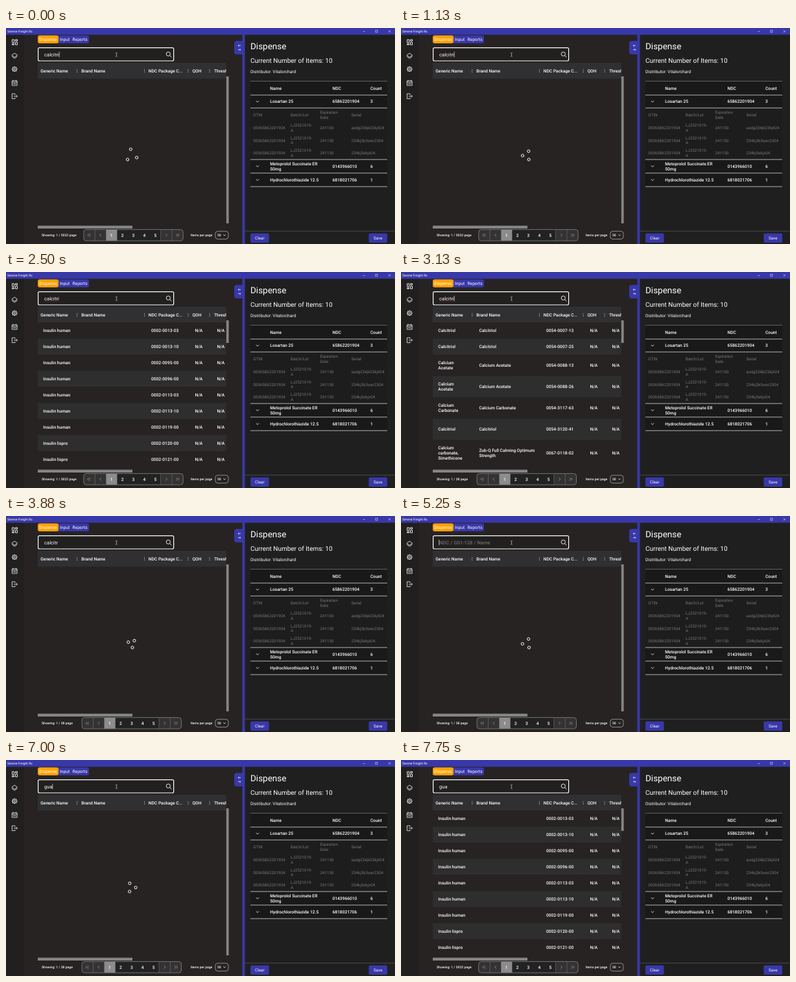
Animation, 600 px wide and 335 px high, one loop 8 s. Source, as an HTML page:

```html
<!DOCTYPE html>
<html lang="en">
<head>
<meta charset="utf-8">
<title>Dispense</title>
<style>
  html, body { margin: 0; width: 100%; height: 100%; overflow: hidden; background: #272323; }
  svg { display: block; width: 100vw; height: 100vh; font-family: Roboto, sans-serif; text-rendering: geometricPrecision; }
</style>
</head>
<body>
<svg id="stage" viewBox="0 0 600 335"></svg>
<script>
const BLUE = '#3938a8', PANEL = '#1f1f1f', MAIN = '#272323', ALT = '#2f2e2f';
const BODY = 6.67, SMALL = 6.25, TINY = 5;
const LOOP = 8000, STEP = 125;

// Drawing helpers; text y is the middle of the capitals.
const rect = (x, y, w, h, fill, extra = '') =>
  `<rect x="${x}" y="${y}" width="${w}" height="${h}" fill="${fill}" ${extra}/>`;
const text = (x, y, str, size = BODY, extra = '') =>
  `<text x="${x}" y="${y + size * 0.355}" font-size="${size}" fill="#fff" ${extra}>${str}</text>`;
const lines = (x, y, str, size = BODY, extra = '', gap = 8) => {
  const parts = str.split('|');
  return parts.map((p, i) => text(x, y + (i - (parts.length - 1) / 2) * gap, p, size, extra)).join('');
};
const path = (d, color = '#fff', width = 0.8) =>
  `<path d="${d}" fill="none" stroke="${color}" stroke-width="${width}"/>`;
const hline = (x1, x2, y, color = '#ddd', width = 0.8) => path(`M${x1} ${y}H${x2}`, color, width);
const chevron = (x, y, dir) => path(`M${x - dir} ${y - 2.2}l${2 * dir} 2.2l${-2 * dir} 2.2`, '#bbb', 0.6);
const down = (x, y, r = 2.2) => path(`M${x - r} ${y - r / 2}l${r} ${r}l${r} ${-r}`);
const group = (id, content) => `<g id="${id}">${content}</g>`;
const MEDIUM = 'font-weight="500"', MID = 'text-anchor="middle"';

function titleBar() {
  return rect(0, 0, 600, 10.5, BLUE) + text(2, 5.2, 'Serene Freight Rx', TINY) +
    path('M550.5 5.5h3M569.8 3.5h3.2v3.2h-3.2zM589.8 3.5l3.4 3.4m0 -3.4l-3.4 3.4', '#fff', 0.5);
}

function sidebar() {
  let gear = '';
  for (let i = 0; i < 8; i++) {
    const a = i * Math.PI / 4, c = Math.cos(a), s = Math.sin(a);
    gear += `M${13.2 + 3 * c} ${63.8 + 3 * s}l${1.3 * c} ${1.3 * s}`;
  }
  return rect(0, 10, 28, 325, '#211f1f') +
    path('M9.5 18h3v4.5h-3zM14.5 18h3v2h-3zM14.5 22h3v4h-3zM9.5 24.5h3v1.5h-3z', '#fff', 0.9) +
    path('M13.2 39l4.3 3.2l-4.3 3.2l-4.3 -3.2zM8.9 44l4.3 3.2l4.3 -3.2') +
    path(gear, '#fff', 1.2) +
    '<g fill="none" stroke="#fff" stroke-width=".8"><circle cx="13.2" cy="63.8" r="3.2"/><circle cx="13.2" cy="63.8" r="1.3"/></g>' +
    path('M9.3 82h7.8v7h-7.8zM9.3 84.2h7.8M11 80.6v1.6M15.4 80.6v1.6M11 86.5h4.5') +
    path('M14 103.5v-1.5h-4.7v7.6h4.7v-1.5M11.8 105.8h5.6m-1.7 -1.8l1.8 1.8l-1.8 1.8');
}

function toolbar() {
  return rect(49, 11.5, 79, 12.3, BLUE, 'rx="3"') + rect(49, 11.5, 32, 12.3, '#ffa200', 'rx="3"') +
    text(51.3, 17.5, 'Dispense') + text(83, 17.5, 'Input') + text(102.5, 17.5, 'Reports') +
    rect(49.6, 30.6, 209, 20.4, '#221f1f', 'rx="2" stroke="#fff" stroke-width="1.2"') +
    '<circle cx="250.3" cy="40.3" r="3.1" fill="none" stroke="#fff" stroke-width=".9"/>' +
    path('M252.6 42.6l2.6 2.6', '#fff', 0.9) +
    path('M168.8 38.6h1l.6 .5l.6 -.5h1M170.4 39v4.6M168.8 44.1h1l.6 -.5l.6 .5h1', '#ddd', 0.6) +
    text(59, 41, '', 7.5, 'id="query" letter-spacing=".07"') +
    '<path id="spell" d="M59 46H82" stroke="#d33" stroke-width=".6" stroke-dasharray="1 .8" opacity=".8"/>' +
    '<path id="caret" d="M0 36.8V45.4" stroke="#fff" stroke-width=".6"/>';
}

function tableHead() {
  const cols = [[53.3, 'Generic Name'], [116.3, 'Brand Name'], [219.8, 'NDC Package C...'], [287.5, 'QOH'], [321, 'Thresh']];
  const dots = [109.7, 213.5, 281, 314].map(x => path(`M${x} 64v5`, '#ccc', 0.9).replace('/>', ' stroke-dasharray="1 1"/>'));
  return rect(49, 54, 291, 24.5, '#303032') +
    cols.map(([x, s]) => text(x, 66.5, s, BODY, MEDIUM)).join('') + dots.join('');
}

function rows(data) {
  let y = 78.5, out = '';
  data.forEach(([generic, brand, ndc, h], i) => {
    const mid = y + h / 2;
    out += rect(49, y, 291, Math.min(h, 304 - y), i % 2 ? ALT : MAIN) +
      lines(57.3, mid, generic, BODY, MEDIUM) + lines(120.4, mid, brand, BODY, MEDIUM) +
      text(224, mid, ndc, BODY, MEDIUM) + text(291.5, mid, 'N/A', BODY, MEDIUM) + text(325.5, mid, 'N/A', BODY, MEDIUM);
    y += h;
  });
  return out;
}

const insulin = ['0013-03', '0013-10', '0095-00', '0096-00', '0113-03', '0113-10', '0119-00', '0120-00', '0121-00']
  .map((n, i) => [i < 7 ? 'Insulin human' : 'Insulin lispro', '', '0002-' + n, 24.95]);
const calcium = [
  ['Calcitriol', 'Calcitriol', '0054-0007-13', 25],
  ['Calcitriol', 'Calcitriol', '0054-0007-25', 25],
  ['Calcium|Acetate', 'Calcium Acetate', '0054-0088-13', 33],
  ['Calcium|Acetate', 'Calcium Acetate', '0054-0088-26', 33],
  ['Calcium|Carbonate', 'Calcium Carbonate', '0054-3117-63', 33],
  ['Calcitriol', 'Calcitriol', '0054-3120-41', 33],
  ['Calcium|carbonate,|Simethicone', 'Zub-Q Full Calming Optimum|Strength', '0067-0118-02', 41],
];

function footer() {
  let pager = rect(119.8, 312.6, 153.4, 17.4, '#222', 'rx="4"') +
    rect(120, 313, 34.4, 16.6, '#343232', 'rx="4"') + rect(238.6, 313, 34.4, 16.6, '#343232', 'rx="4"') +
    rect(154.4, 312.8, 17, 17, '#8c8c8c') +
    path('M137.2 313V330M154.4 313V330M238.6 313V330M256 313V330', '#777', 0.6) +
    rect(119.8, 312.6, 153.4, 17.4, 'none', 'rx="4" stroke="#8a8a8a" stroke-width=".8"') +
    chevron(126.8, 321.3, -1) + chevron(129.4, 321.3, -1) + chevron(145.8, 321.3, -1) +
    chevron(247.4, 321.3, 1) + chevron(263.4, 321.3, 1) + chevron(266, 321.3, 1);
  for (let n = 1; n <= 5; n++) pager += text(145.8 + n * 16.9, 321.3, n, BODY, MEDIUM + MID.replace('text', ' text'));
  return rect(49, 304, 296, 31, MAIN) + rect(49, 306.6, 146, 4.4, '#858585') +
    text(55, 321.3, '', TINY, 'id="showing" font-weight="500" letter-spacing=".04"') + group('pager', pager) +
    text(284.8, 321.3, 'Items per page', TINY, MEDIUM) +
    rect(322.8, 315.2, 20.2, 12.2, 'none', 'rx="4" stroke="#bbb" stroke-width=".7"') +
    text(326, 321.3, '50', TINY, MEDIUM) + down(337, 321.3, 1.6);
}

function panel() {
  const grey = 'style="fill:#777"';
  const item = (y, name, ndc, count) => down(388, y) + lines(407.3, y, name, BODY, MEDIUM) +
    text(503.5, y, ndc, BODY, MEDIUM) + text(562, y, count, BODY, MEDIUM);
  const lot = (y, gtin, batch, date, serial) => text(381.3, y, gtin, SMALL, grey) +
    lines(439, y, batch, SMALL, grey, 7.6) + lines(484.4, y, date, SMALL, grey, 7.6) + text(532.5, y, serial, SMALL, grey);
  const button = (x, label) => rect(x, 318.5, 28.6, 14.4, BLUE, 'rx="2"') + text(x + 14.3, 325.6, label, SMALL, MID);

  return rect(368, 10.5, 232, 325, PANEL) + rect(364.5, 10, 4, 325, BLUE) +
    `<path d="M368 20H356a4 4 0 0 0 -4 4V37a4 4 0 0 0 4 4H368z" fill="${BLUE}"/>` +
    path('M362 27.3h-4m1.4 -1.3l-1.4 1.3l1.4 1.3M358 33.6h4m-1.4 -1.3l1.4 1.3l-1.4 1.3', '#fff', 0.7) +
    text(377, 28, 'Dispense', 13.5) + text(377, 50.5, 'Current Number of Items: 10', 10) +
    text(377, 67.5, 'Distributor: Vitalorchard') +
    rect(377, 82.5, 211, 163.5, '#191919') + rect(377, 124, 211, 80, '#1d1d1d') +
    text(407.3, 93.3, 'Name', BODY, MEDIUM) + text(503.5, 93.3, 'NDC', BODY, MEDIUM) + text(562, 93.3, 'Count', BODY, MEDIUM) +
    hline(377, 588, 82.5, '#777') + [104, 124, 204, 225, 246].map(y => hline(377, 588, y)).join('') +
    item(114, 'Losartan 25', '65862201904', 3) +
    item(214.3, 'Metoprolol Succinate ER|50mg', '0143966010', 6) +
    item(235.6, 'Hydrochlorothiazide 12.5', '6818021706', 1) +
    lot(134.7, 'GTIN', 'Batch/Lot', 'Expiration|Date', 'Serial') +
    ['asdg234jk23kj424', '234kj3k5wer2304', '234kj5ekjx04']
      .map((s, i) => lot(154.6 + i * 19.7, '00365862201904', 'LJ2521019-|A', '241130', s)).join('') +
    hline(368, 600, 315, '#555') + button(377, 'Clear') + button(559.5, 'Save');
}

const ring = '<circle r="2.1" fill="none" stroke="#fff" stroke-width="1"/>';
document.getElementById('stage').innerHTML =
  rect(0, 0, 600, 335, MAIN) + sidebar() + toolbar() + tableHead() +
  group('insulin', rows(insulin)) + group('calcium', rows(calcium)) + group('spinner', ring.repeat(3)) +
  rect(339.8, 54, 25, 250, MAIN) + rect(339.8, 75, 3.8, 228, '#858585', 'id="thumb"') +
  footer() + panel() + titleBar();

const $ = id => document.getElementById(id);
const show = (id, on) => $(id).setAttribute('visibility', on ? 'visible' : 'hidden');

// Search field contents from each moment on.
const keys = [[-125, 'calcitri'], [3375, 'calcitr'], [4000, 'calc'], [4125, 'c'], [4250, ''],
  [6000, 'g'], [6500, 'gu'], [6875, 'gua']];
// Pauses in which the screen stands still: start, end.
const pauses = [[875, 1125], [2000, 2500], [4750, 5000], [7250, 7750], [7750, 8000]];
const corners = [[184.6, 204], [193.85, 185], [203.1, 204]];

function spin(t) {
  const phase = t < 2500 ? 0.84 + t / 760 : 0.44 + (t - 3875) / 738;
  const f = ((phase % 1) + 1) % 1;
  [...$('spinner').children].forEach((dot, i) => {
    const [x1, y1] = corners[i], [x2, y2] = corners[(i + 1) % 3];
    dot.setAttribute('cx', x1 + (x2 - x1) * f);
    dot.setAttribute('cy', y1 + (y2 - y1) * f);
  });
}

function draw(time) {
  let t = Math.floor(time / STEP) * STEP;
  const pause = pauses.find(([a, b]) => t >= a && t < b);
  if (pause) t = pause[0];

  const [typedAt, value] = keys.filter(k => k[0] <= t).pop();
  const query = $('query');
  query.textContent = value || 'NDC / GS1-128 / Name';
  query.setAttribute('fill', value ? '#fff' : '#858383');
  const end = 59 + (value ? query.getComputedTextLength() + 0.2 : -0.3);
  $('caret').setAttribute('transform', `translate(${end})`);
  show('caret', Math.floor((t - typedAt) / 500) % 2 === 0);
  show('spell', t >= 1125 && t < 3375);

  const found = t >= 3125 && t < 3375;
  const all = (t >= 2500 && t < 3125) || t >= 7750;
  const few = t >= 3125 && t < 7750;
  show('insulin', all);
  show('calcium', found);
  show('spinner', !all && !found);
  spin(t);
  $('thumb').setAttribute('height', all || found ? 35 : 228);
  $('showing').textContent = `Showing: 1 / ${few ? 38 : 5022} page`;
  $('pager').setAttribute('transform', `translate(${few ? -2.7 : 0})`);
}

const start = performance.now();
function tick() {
  draw((performance.now() - start) % LOOP);
  requestAnimationFrame(tick);
}
tick();
</script>
</body>
</html>
```
